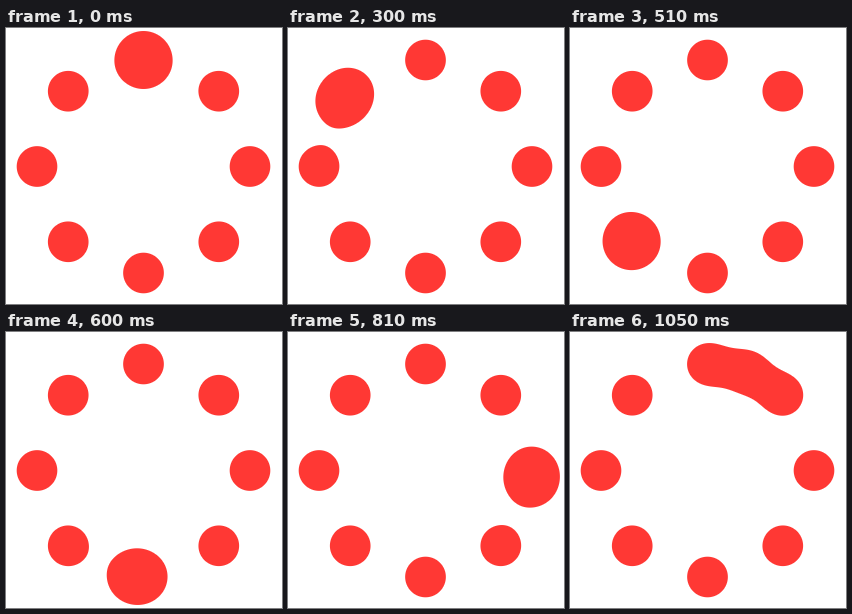
Animation of 276x276 px, one loop 1080 ms. Source, as an HTML page with a canvas:

```html
<!DOCTYPE html>
<html lang="en">
<head>
<meta charset="utf-8">
<title>Gooey ring loader</title>
<style>
  html, body { margin: 0; width: 100%; height: 100%; overflow: hidden; background: #fff; }
  canvas { display: block; }
</style>
</head>
<body>
<canvas id="stage" width="276" height="276"></canvas>
<script>
const SIZE = 276, LOOP = 1080, STEP = 30;
const CX = 137.5, CY = 138.5, RING = 106.5, BALL = 20.3;
const SPREAD = 618;                              // width of each ball's gaussian field
const LEVEL = Math.exp(-BALL * BALL / SPREAD);   // field value on a lone ball's edge
const SWEEP = 1230;                              // full turn, cut short by the loop
const COLOR = [255, 56, 52];

const ctx = document.getElementById('stage').getContext('2d');
const image = ctx.createImageData(SIZE, SIZE);
const count = SIZE * SIZE;

// Position on the ring, counterclockwise from the top
const onRing = turn => {
  const a = turn * 2 * Math.PI;
  return [CX - RING * Math.sin(a), CY - RING * Math.cos(a)];
};

// Adds a ball's field and its gradient to f, gx, gy
function addBall({ f, gx, gy }, [bx, by]) {
  for (let y = 0, i = 0; y < SIZE; y++) {
    for (let x = 0; x < SIZE; x++, i++) {
      const dx = x + 0.5 - bx, dy = y + 0.5 - by, d2 = dx * dx + dy * dy;
      if (d2 > 6000) continue;
      const v = Math.exp(-d2 / SPREAD), k = 2 * v / SPREAD;
      f[i] += v;
      gx[i] -= k * dx;
      gy[i] -= k * dy;
    }
  }
}

const makeField = () => ({
  f: new Float32Array(count), gx: new Float32Array(count), gy: new Float32Array(count)
});
const still = makeField(), field = makeField();
for (let n = 0; n < 8; n++) addBall(still, onRing(n / 8));

// Soft ease in and out
function turnAt(ms) {
  const u = ms / SWEEP;
  return 0.9 * (1 - Math.cos(Math.PI * u)) / 2 + 0.1 * u;
}

function draw(ms) {
  for (const key in field) field[key].set(still[key]);
  addBall(field, onRing(turnAt(ms)));
  const { f, gx, gy } = field, { data } = image;
  for (let i = 0; i < count; i++) {
    const slope = Math.hypot(gx[i], gy[i]) + 1e-4;
    const cover = Math.min(1, Math.max(0, (f[i] - LEVEL) / slope + 0.5));
    for (let c = 0; c < 3; c++) data[i * 4 + c] = 255 + (COLOR[c] - 255) * cover;
    data[i * 4 + 3] = 255;
  }
  ctx.putImageData(image, 0, 0);
}

let shown = -1;
function tick() {
  const step = Math.floor(performance.now() % LOOP / STEP);
  if (step !== shown) draw((shown = step) * STEP);
  requestAnimationFrame(tick);
}
tick();
</script>
</body>
</html>
```
